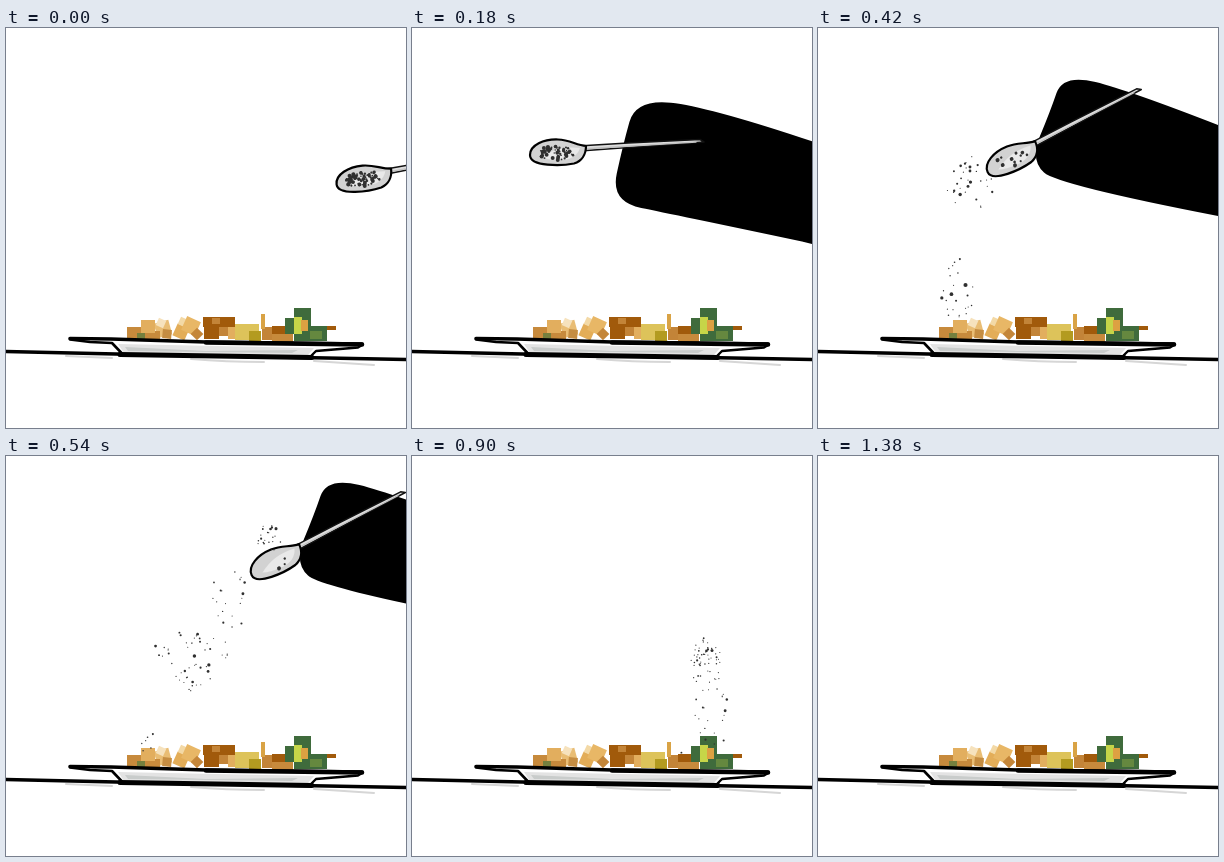
Animation of 400 by 400 pixels, one loop 1.44 s. Source, as an HTML page with a canvas:

```html
<!DOCTYPE html>
<html lang="en">
<head>
<meta charset="utf-8">
<title>Seasoning</title>
<style>
html, body { margin: 0; width: 100%; height: 100%; overflow: hidden; background: #fff; }
canvas { display: block; width: 100vw; height: 100vh; }
</style>
</head>
<body>
<canvas id="stage" width="400" height="400"></canvas>
<script>
const ctx = document.getElementById('stage').getContext('2d');
const STEP = 60, STEPS = 24;
const rad = d => d * Math.PI / 180;
const mix = (a, b, k) => a + (b - a) * k;

function seeded(s) {
  return () => {
    s = (s * 1664525 + 1013904223) >>> 0;
    return s / 4294967296;
  };
}

function dot(x, y, r) {
  ctx.fillStyle = '#303030';
  ctx.beginPath();
  ctx.arc(x, y, r, 0, 7);
  ctx.fill();
}

function shape(d, fill, stroke, width) {
  const p = new Path2D(d);
  if (fill) { ctx.fillStyle = fill; ctx.fill(p); }
  if (stroke) { ctx.strokeStyle = stroke; ctx.lineWidth = width; ctx.stroke(p); }
}

function drawTable() {
  shape('M60 328 L106 330 M185 331 Q220 334 258 334 M308 333 L368 337', null, '#d6d6d6', 2);
  shape('M0 323.5 L110 326 L400 331.5', null, '#000', 3.6);
}

// Blocks by colour: x, y, width, height
const FOOD = {
  '#c78a3c': [[121, 299, 14, 12], [139, 303, 15, 9], [266, 306, 21, 8]],
  '#e2ae5e': [[135, 292, 14, 13], [222, 299, 7, 12]],
  '#75803e': [[131, 305, 8, 6]],
  '#a15a0b': [[197, 289, 32, 10], [198, 299, 15, 12], [266, 298, 14, 8], [320, 298, 10, 4]],
  '#c38438': [[206, 290, 8, 6], [213, 299, 9, 9], [256, 299, 10, 13]],
  '#ddc35a': [[229, 296, 24, 16]],
  '#b39b20': [[243, 303, 12, 10]],
  '#d9a345': [[255, 286, 4, 15]],
  '#3f6b3c': [[288, 280, 17, 33], [279, 290, 10, 16], [302, 298, 19, 15]],
  '#65883f': [[304, 303, 12, 8]],
  '#c6d548': [[288, 289, 8, 17]],
  '#dda142': [[295, 292, 7, 11]]
};
// Slanted blocks: colour, centre, size
const CHUNKS = [
  ['#e9bd74', 157, 301, 15], ['#f6e2bd', 155, 295, 8], ['#c58d42', 161, 306, 9],
  ['#e3ad58', 175, 304, 13], ['#f3d9a6', 177, 294, 8], ['#e8b766', 185, 298, 15],
  ['#c48639', 191, 306, 9]
];

function drawFood() {
  CHUNKS.forEach(([color, x, y, size], i) => {
    ctx.save();
    ctx.translate(x, y);
    ctx.rotate(rad(i % 2 ? 24 : i * 10 - 15));
    ctx.fillStyle = color;
    ctx.fillRect(-size / 2, -size / 2, size, size);
    ctx.restore();
  });
  for (const color in FOOD) {
    ctx.fillStyle = color;
    for (const r of FOOD[color]) ctx.fillRect(...r);
  }
}

function drawPlate() {
  shape('M64 310 L357 316 L312 322 L304 328 L116 326 L105 315Z', '#fff');
  shape('M112 316 L308 320 L302 327 L118 325Z', '#e3e3e3');
  shape('M119 319 L200 323 L292 322 L286 325 L122 323Z', '#c9cccb');
  shape('M64 310.5 L105 311 L200 314 L356 316', null, '#000', 3.6);
  shape('M200 314.5 L356 316.5', null, '#000', 4.6);
  shape('M64 311.5 L84 314 L106 315 L116 325.5', null, '#000', 2.6);
  shape('M356 317 L352 319.5 L310 323 L305 328', null, '#000', 2.4);
  shape('M114 326.5 L306 329.5', null, '#000', 5);
}

// Arm outlines measured from the bowl, smoothed between points
const ARMS = [
  [234, 0, 134, -36, 79, -44, 65, 4, 55, 51, 124, 70, 234, 103],
  [259, -35, 169, -60, 76, -66, 65, -24, 49, 48, 99, 50, 259, 69],
  [206, -33, 116, -68, 51, -84, 38, -46, 18, 2, 46, 27, 206, 58]
];

function drawArm(x, y, pose) {
  const i = Math.min(1, Math.floor(pose));
  const p = ARMS[i].map((v, n) => mix(v, ARMS[i + 1][n], pose - i) + (n % 2 ? y : x));
  const end = p.length - 2;
  ctx.fillStyle = '#000';
  ctx.beginPath();
  ctx.moveTo(p[0], p[1]);
  for (let n = 2; n < end; n += 2) {
    const k = n + 2 === end ? 1 : .5;
    ctx.quadraticCurveTo(p[n], p[n + 1], mix(p[n], p[n + 2], k), mix(p[n + 1], p[n + 3], k));
  }
  ctx.lineTo(p[end] + 90, p[end + 1] + 24);
  ctx.lineTo(p[0] + 90, p[1] + 30);
  ctx.fill();
}

function drawSpoon(x, y, tilt, grains) {
  ctx.save();
  ctx.translate(x, y);
  ctx.rotate(rad(tilt));
  shape('M20 -6 L70 -9 L142 -12.5 L146 -10 L70 -4.5 L22 -1Z', '#dedede', '#111', 1.5);
  shape('M24 -3 L138 -10', null, '#c2c2c2', 1.3);
  shape('M-28 3 C-28 -7 -14 -13 0 -12.5 C12 -12 18 -7 28 -6 C28 2 24 9 16 11.5 C4 14 -28 15 -28 3Z', '#d2d2d2', '#000', 2.2);
  shape('M-17 5 Q0 -7 22 -4 Q18 8 2 8 Q-10 8 -17 5Z', '#e9e9e9');
  const rnd = seeded(41);
  for (let i = 0; i < grains; i++) {
    const a = rnd() * 6.283, d = Math.sqrt(rnd());
    dot(Math.cos(a) * d * 20, 1 + Math.sin(a) * d * 7, .7 + rnd() * 1.4);
  }
  ctx.restore();
}

// Falling pepper: count, largest radius, first and last step, x, y, speed x, y, spread x, y
const CLOUDS = [
  [24, 2.1, 4, 9, 133, 191, 2.5, 23.5, 20, 38],
  [32, 2.3, 5, 7, 148, 119, 3, 18, 26, 27],
  [32, 1.8, 8, 16, 170, 175, 16, 20, 38, 20],
  [18, 1.5, 8, 12, 178, 195, 9.5, 27, 18, 14],
  [20, 1.6, 9, 17, 224, 143, 12.7, 19.5, 20, 32],
  [22, 1.6, 9, 18, 262, 82, 5, 20.3, 13, 15],
  [34, 1, 13, 18, 286, 165, 4, 21, 17, 28],
  [12, .9, 19, 22, 318, 290, 12, 10, 32, 18]
];

function drawCloud([count, size, from, to, x, y, vx, vy, sx, sy], seed, step) {
  if (step < from || step > to) return;
  const age = step - from, floor = step > 18 ? 330 : 298;
  const rnd = seeded(seed * 7919 + 17);
  for (let i = 0; i < count; i++) {
    const turn = rnd() * 6.283, d = Math.sqrt(rnd()), big = rnd();
    const py = y + vy * age + Math.sin(turn) * d * sy;
    if (py < floor) dot(x + vx * age + Math.cos(turn) * d * sx, py, .55 + (size - .55) * big ** 3);
  }
}

// Spoon per step: bowl x, y, tilt in degrees, arm pose, grains left in the bowl
const SPOON = [
  [358, 150, -7, 0, 75], [255, 122, -3, 0, 70], [166, 106, 0, 0, 66],
  [146, 124, 0, .4, 54], [142, 126, -1, .8, 40], [141, 142, -2, 1, 20],
  [163, 134, -12, 1.5, 16], [194, 130, -24, 2, 12], [232, 107, -24, 2, 6],
  [270, 105, -24, 2, 3], [338, 130, -22, 2, 0], [420, 168, -22, 2, 0]
];

function draw(step) {
  ctx.fillStyle = '#fff';
  ctx.fillRect(0, 0, 400, 400);
  drawTable();
  drawFood();
  drawPlate();
  if (SPOON[step]) {
    const [x, y, tilt, arm, grains] = SPOON[step];
    drawArm(x, y, arm);
    drawSpoon(x, y, tilt, grains);
  }
  CLOUDS.forEach((c, i) => drawCloud(c, i + 1, step));
}

ctx.lineCap = ctx.lineJoin = 'round';
function tick() {
  draw(Math.floor(performance.now() / STEP) % STEPS);
  requestAnimationFrame(tick);
}
tick();
</script>
</body>
</html>
```
